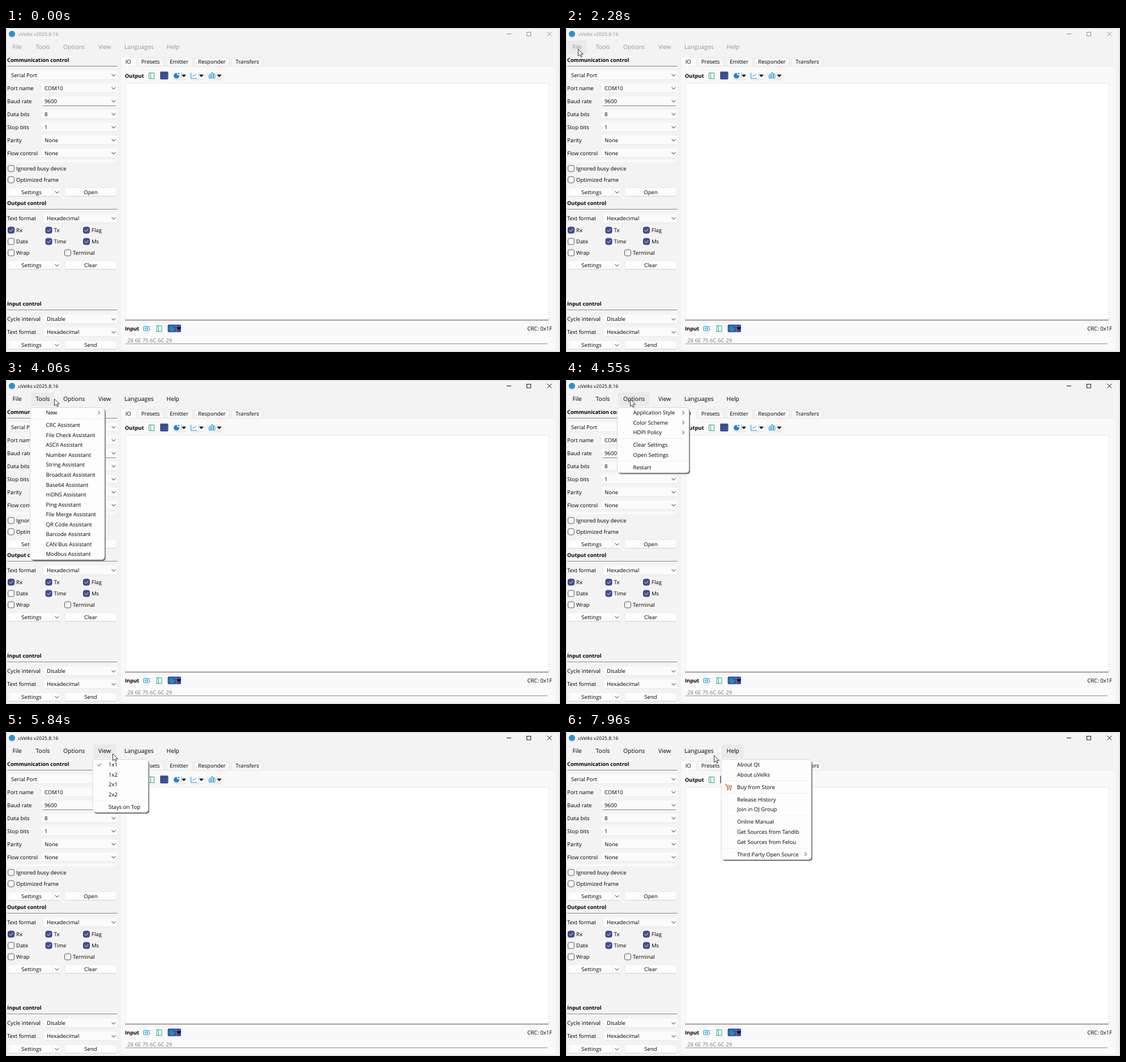
Recreate the animation shown at these times as an HTML page. Size 978 by 573 pixels, loop 8 s.

```html
<!DOCTYPE html>
<html lang="en">
<head>
<meta charset="utf-8">
<style>
  html, body { margin: 0; width: 100%; height: 100%; overflow: hidden; background: #f3f3f3; }
  svg { display: block; width: 978px; height: 573px; }
  text { font: 9.55px "Open Sans", "Noto Sans", "Noto Sans CJK SC", "DejaVu Sans", sans-serif; fill: #000;
    white-space: pre; text-rendering: geometricPrecision; }
  .bold { font-weight: 700; font-size: 9.25px; }
  .title { font-size: 8.6px; }
  .bar { font-size: 10.35px; }
  .mid { text-anchor: middle; }
  .end { text-anchor: end; }
  .soft { fill: #777; }
  .line { fill: none; stroke: #222; stroke-width: 1; }
  #chrome text { fill: #000; }
  #chrome .line { stroke: #111; }
  #chrome.idle text { fill: #91918c; }
  #chrome.idle .line { stroke: #8c8c8c; }
</style>
</head>
<body>
<svg id="stage" viewBox="0 0 978 573"></svg>
<script>
const LOOP = 8000;
const PITCH = 17.55;

const text = (x, y, s, cls = "") => `<text x="${x}" y="${y + 3.5}" class="${cls}">${s}</text>`;
const rect = (x, y, w, h, fill, extra = "") =>
  `<rect x="${x}" y="${y}" width="${w}" height="${h}" fill="${fill}" ${extra}/>`;
const disc = (x, y, r, fill) => `<circle cx="${x}" cy="${y}" r="${r}" fill="${fill}"/>`;
const path = (d, extra = "") => `<path d="${d}" class="line" ${extra}/>`;
const chevron = (x, y) => path(`M${x - 3.5} ${y - 1.5}l3.5 3.5l3.5 -3.5`);
const caret = (x, y) => `<path d="M${x - 4} ${y - 2}h8l-4 4.5z" fill="#000"/>`;
const rule = (x1, x2, y, color, w = 1) => rect(x1, y, x2 - x1, w, color);

const combos = [];
function combo(x, y, value, editable) {
  combos.push({ x, y });
  const w = 196 - x;
  return rect(x, y - 8, w, 16, "#fbfbfb", 'rx="2" class="combo"') +
    (editable ? rule(x + 2, 194, Math.round(y + 7.7), "#858585") : rule(x + 2, 194, y + 7.5, "#e5e5e5")) +
    text(x + 5, y, value) + chevron(190, y);
}

function button(x, y, w, label, split) {
  return rect(x, y - 7.5, w, 15, "#fdfdfd", 'rx="2" stroke="#e9e9e9" stroke-width=".8"') +
    rule(x + 1, x + w - 1, y + 7, "#d0d0d0") +
    text(split ? 45 : x + w / 2, y, label, "mid") +
    (split ? rule(82, 83, y - 7, "#e6e6e6", 14) + chevron(90, y) : "");
}
const buttons = (y, label) => button(4, y, 92, "Settings", true) + button(104, y, 91, label);

function check(x, y, label, on) {
  return rect(x + .5, y - 5.5, 11, 11, on ? "#434f93" : "#f8f8f8",
    `rx="3" stroke="${on ? "#2f3974" : "#555"}"`) +
    (on ? path(`M${x + 3} ${y}l2.3 2.3l4 -4.3`, 'style="stroke:#fff"') : "") +
    text(x + 15, y, label);
}

const heading = (y, label) => text(2, y, label, "bold") + rule(2, 197, Math.floor(y + 11), "#898989");

function sidebar() {
  const fields = [["Port name", "COM10"], ["Baud rate", "9600"], ["Data bits", "8"],
    ["Stop bits", "1"], ["Parity", "None"], ["Flow control", "None"]];
  const field = (x, y, label, value, editable) => text(2, y, label) + combo(x, y, value, editable);
  return heading(56.5, "Communication control") + combo(4, 83.3, "Serial Port") +
    fields.map(([label, value], i) => field(63, 106.3 + i * 22.95, label, value, i === 1)).join("") +
    rect(3, 234, 193, 3, "#fbfbfb") +
    check(3, 248.5, "Ignored busy device") + check(3, 268.3, "Optimized frame") +
    buttons(290, "Open") +
    heading(309.5, "Output control") + field(67, 336.5, "Text format", "Hexadecimal") +
    check(3, 357.5, "Rx", true) + check(69.5, 357.5, "Tx", true) + check(136, 357.5, "Flag", true) +
    check(3, 377.5, "Date") + check(69.5, 377.5, "Time", true) + check(136, 377.5, "Ms", true) +
    check(3, 397.5, "Wrap") + check(103, 397.5, "Terminal") +
    buttons(419.3, "Clear") +
    heading(487.5, "Input control") + field(67, 514.8, "Cycle interval", "Disable") +
    field(67, 537.8, "Text format", "Hexadecimal") + buttons(560.6, "Send");
}

const plate = (x, y, w) => rect(x, y - 7.5, w, 15, "#fdfdfd", 'rx="2"') + rule(x + 1, x + w - 1, y + 7, "#dcdcdc");
const panelIcon = (x, y) => plate(x - 7, y, 14) +
  path(`M${x - 4.5} ${y - 5}h9v10h-9zM${x - 1.5} ${y - 5}v10`, 'style="stroke:#219b84"');
const globe = (x, y, back) => disc(x, y, 5, "#168bd2") + disc(x + 3.5, y - 3.5, 2.6, back) +
  disc(x + 4, y - 4, 1.4, "#168bd2");
const blue = 'style="stroke:#168bd2"';

function workspace() {
  const tabs = [["IO", 203, 27], ["Presets", 231, 48], ["Emitter", 281, 49], ["Responder", 332, 63], ["Transfers", 398, 56]];
  return rect(202, 67.5, 769.5, 502.5, "#f9f9f9", 'rx="2" stroke="#ececec"') +
    tabs.map(([name, x, w], i) => rect(x + .5, 52, w - 1, 16, i ? "#f5f5f5" : "#fbfbfb",
      `rx="2" stroke="${i ? "#e5e5e5" : "#f0f0f0"}"`) + text(x + w / 2 - (i ? 0 : .8), 59.8, name, "mid")).join("") +
    text(210, 84, "Output", "bold") + panelIcon(257, 84.3) +
    rect(272, 77, 14.5, 14, "#434f93", 'rx="2"') +
    `<circle cx="278.5" cy="83" r="3" class="line" style="stroke:#314c87"/>` +
    path("M280.8 85.3l2.5 2.5", 'style="stroke:#314c87"') +
    plate(294, 84, 25) + globe(301, 84.5, "#fdfdfd") + rule(309, 310, 78, "#b9b9b9", 12) + caret(314, 84.5) +
    plate(325, 84, 25) + path("M326.5 79v10h11M328 86.5l3 -3l2 1l4 -4", blue) +
    rule(340, 341, 78, "#c8c8c8", 12) + caret(345, 84.5) +
    plate(357, 84, 25) + path("M358.5 82.5h2.5v6.5h-2.5zM362.5 79h2.5v10h-2.5zM366.5 81h2.5v8h-2.5z", blue) +
    rule(372, 373, 78, "#c8c8c8", 12) + caret(376.5, 84.5) +
    rect(210.5, 97.5, 747.5, 419, "#fff", 'rx="2" stroke="#e8e8e8"') + rule(210, 958, 516, "#505050") +
    text(210, 531.5, "Input", "bold") + plate(241, 531.5, 14) +
    rect(242.7, 527.5, 10.5, 8, "#e9f6fd", `rx="1.5" ${blue}`) + path("M245 530.3h6M245 532.8h6", blue) +
    panelIcon(270.5, 531.5) +
    rect(285.5, 524.5, 23.5, 13.5, "#434f93", 'rx="2"') + globe(293, 531.5, "#434f93") +
    rule(300, 301, 525, "#7480b5", 13) + caret(305, 531.5) +
    text(964, 531.5, "CRC: 0x1F", "end") +
    rect(210, 545, 747, 14, "#fbfbfb", 'id="entry" rx="2"') + rule(211, 956, 558, "#8a8a8a") +
    text(214, 552.3, "28 6E 75 6C 6C 29", "soft");
}

// Rows: "-" is a separator, ">" opens a submenu, "*" is ticked, "$" carries the cart, "|" precedes a shortcut.
const menus = [
  { name: "File", x: 11.5, hot: [2, 35], left: 1, width: 210, rows:
    "New Window|Ctrl+N,-,Save Parameters|Ctrl+S,Import Parameters|Ctrl+O,Export Parameters|Ctrl+Shift+S,-,Exit Application" },
  { name: "Tools", x: 52.5, hot: [44, 41], left: 42, width: 132, rows: ">New,-," +
    ["CRC", "File Check", "ASCII", "Number", "String", "Broadcast", "Base64", "mDNS", "Ping",
      "File Merge", "QR Code", "Barcode", "CAN Bus", "Modbus"].map(s => s + " Assistant").join() },
  { name: "Options", x: 101, hot: [92, 55], left: 90, width: 127, rows:
    ">Application Style,>Color Scheme,>HDPI Policy,-,Clear Settings,Open Settings,-,Restart" },
  { name: "View", x: 163, hot: [154, 40], left: 152.5, width: 98.5, rows: "*1x1,1x2,2x1,2x2,-,Stays on Top" },
  { name: "Languages", x: 209, hot: [202, 65], left: 200, width: 118, rows:
    "العربية,Čeština,Dansk,Deutsch,*English,Español,فارسی,Suomi,Français,עִבְרִית,Italiano,日本语,한글,Lietuvių kalba," +
    "Polski,Português,русский язык,Slovenčina,Slovenščina,Svenska,українська мова,简体中文,繁體中文" },
  { name: "Help", x: 283.5, hot: [274.5, 39], left: 273.5, width: 159.5, rows:
    "About Qt,About uVelks,-,$Buy from Store,-,Release History,Join in OJ Group,-,Online Manual," +
    "Get Sources from Tandib,Get Sources from Felou,-,>Third Party Open Source" }
];

const cart = (x, y) => path(`M${x} ${y - 4.5}h2.5l2 7h6l1.5 -5h-8.5M${x + 4} ${y}h7`, 'style="stroke:#c0501f"') +
  disc(x + 5, y + 4.7, 1.2, "#c0501f") + disc(x + 10, y + 4.7, 1.2, "#c0501f");

function popup({ left, width, rows }) {
  let y = 57.7 - PITCH, body = "";
  for (const row of rows.split(",")) {
    if (row === "-") {
      body += rule(left + 1, left + width - 1, Math.round(y + 10.6), "#efefef");
      y += 4.5;
      continue;
    }
    y += PITCH;
    const [label, keys] = row.replace(/^[>*$]/, "").split("|");
    body += text(left + 28.5, y, label);
    if (keys) body += text(left + 142, y, keys, "soft");
    if (row[0] === ">") body += path(`M${left + width - 11.5} ${y - 3}l3 3l-3 3`);
    if (row[0] === "*") body += path(`M${left + 9} ${y + .3}l2.2 2.2l4.3 -4.5`);
    if (row[0] === "$") body += cart(left + 7, y);
  }
  const height = y + 9.5 - 48.5;
  return `<g class="popup">` + rect(left + 2.5, 51, width - .5, height, "#777", 'rx="5"') +
    rect(left + .5, 48.5, width - .5, height, "#fdfdfd", 'rx="5" stroke="#d9d9d9"') + body + `</g>`;
}

const chrome = `<g id="chrome">` + text(21, 10.5, "uVelks v2025.8.16", "title") +
  menus.map(m => rect(m.hot[0], 22, m.hot[1], 24, "#eaeaea", 'rx="3" class="hot"') +
    text(m.x, 33.7, m.name, "bar")).join("") +
  path("M884 10.5h8M919.5 7.5h7v6.5h-7zM955.5 6.8l7.5 7.5M963 6.8l-7.5 7.5") + `</g>`;

const stage = document.getElementById("stage");
stage.innerHTML = rect(0, 0, 978, 573, "#f3f3f3") + disc(10.5, 10.5, 5.5, "#2a94cf") +
  sidebar() + workspace() + chrome +
  path("M.5 573V4.5q0 -4 4 -4h968.5q4 0 4 4V572.5H0", 'style="stroke:#d6d6d6"') +
  menus.map(popup).join("") +
  `<path id="cursor" d="M.5 .5v12.2l2.9 -2.7l2 4.2l2 -.9l-2 -4.1h4z" fill="#fff" stroke="#222" stroke-width=".9"/>`;

const all = selector => [...stage.querySelectorAll(selector)];
const [cursor] = all("#cursor"), [bar] = all("#chrome"), [entry] = all("#entry");
const popups = all(".popup"), hots = all(".hot"), boxes = all(".combo");

const bursts = [[780, 1060, 5], [1260, 1530, 5], [1720, 2480, 11], [2540, 3290, 12], [3360, 4130, 12],
  [4200, 4970, 12], [5040, 5840, 13], [5910, 6660, 12], [6730, 7220, 8], [7960, 7960, 1]];
const trail = [[780, 891, 558], [1060, 317, 353], [1260, 270, 300], [1530, 61, 80], [1720, 58, 76], [2130, 24, 38],
  [2480, 14, 34], [2540, 17, 34], [3080, 43, 31], [3290, 52, 31], [3360, 55, 31], [4060, 85, 33], [4130, 97, 34],
  [4200, 100, 34], [4970, 128, 34], [5040, 143, 36], [5170, 158, 37], [5840, 188, 38], [5910, 195, 38],
  [6530, 243, 37], [6660, 249, 38], [6730, 254, 38], [7220, 290, 37], [7960, 261, 41]];
const opening = [2270, 3140, 4125, 5150, 6000, 7000];

function stepped(t) {
  const burst = bursts.findLast(b => b[0] <= t);
  if (!burst) return 0;
  const [start, end, steps] = burst;
  if (t >= end) return end;
  const step = (end - start) / (steps - 1);
  return start + Math.floor((t - start) / step + .15) * step;
}

function cursorAt(t) {
  const i = trail.findLastIndex(k => k[0] <= t);
  const a = trail[i], b = trail[i + 1] || a;
  const f = a === b ? 0 : (t - a[0]) / (b[0] - a[0]);
  return [a[1] + (b[1] - a[1]) * f, a[2] + (b[2] - a[2]) * f].map(Math.round);
}

const show = (el, on) => el.setAttribute("visibility", on ? "visible" : "hidden");

function draw(time) {
  const t = stepped(time);
  const visible = t >= 780;
  const [x, y] = visible ? cursorAt(t) : [-50, -50];
  const open = opening.findLastIndex(at => at <= t);
  show(cursor, visible);
  cursor.setAttribute("transform", `translate(${x} ${y})`);
  bar.setAttribute("class", open < 0 ? "idle" : "");
  popups.forEach((p, i) => show(p, i === open));
  hots.forEach((h, i) => {
    const [left, width] = menus[i].hot;
    const hover = open < 0 && y > 22 && y < 46 && x >= left && x < left + width;
    show(h, i === open || hover);
  });
  boxes.forEach((box, i) => {
    const c = combos[i];
    const hover = open < 0 && x >= c.x && x < 196 && Math.abs(y - c.y) < 8;
    box.setAttribute("fill", hover ? "#f0f0f0" : "#fbfbfb");
  });
  entry.setAttribute("fill", y > 545 && y < 560 ? "#f5f5f5" : "#fbfbfb");
}

const began = performance.now();
function tick() {
  draw((performance.now() - began) % LOOP);
  requestAnimationFrame(tick);
}
tick();
</script>
</body>
</html>
```
